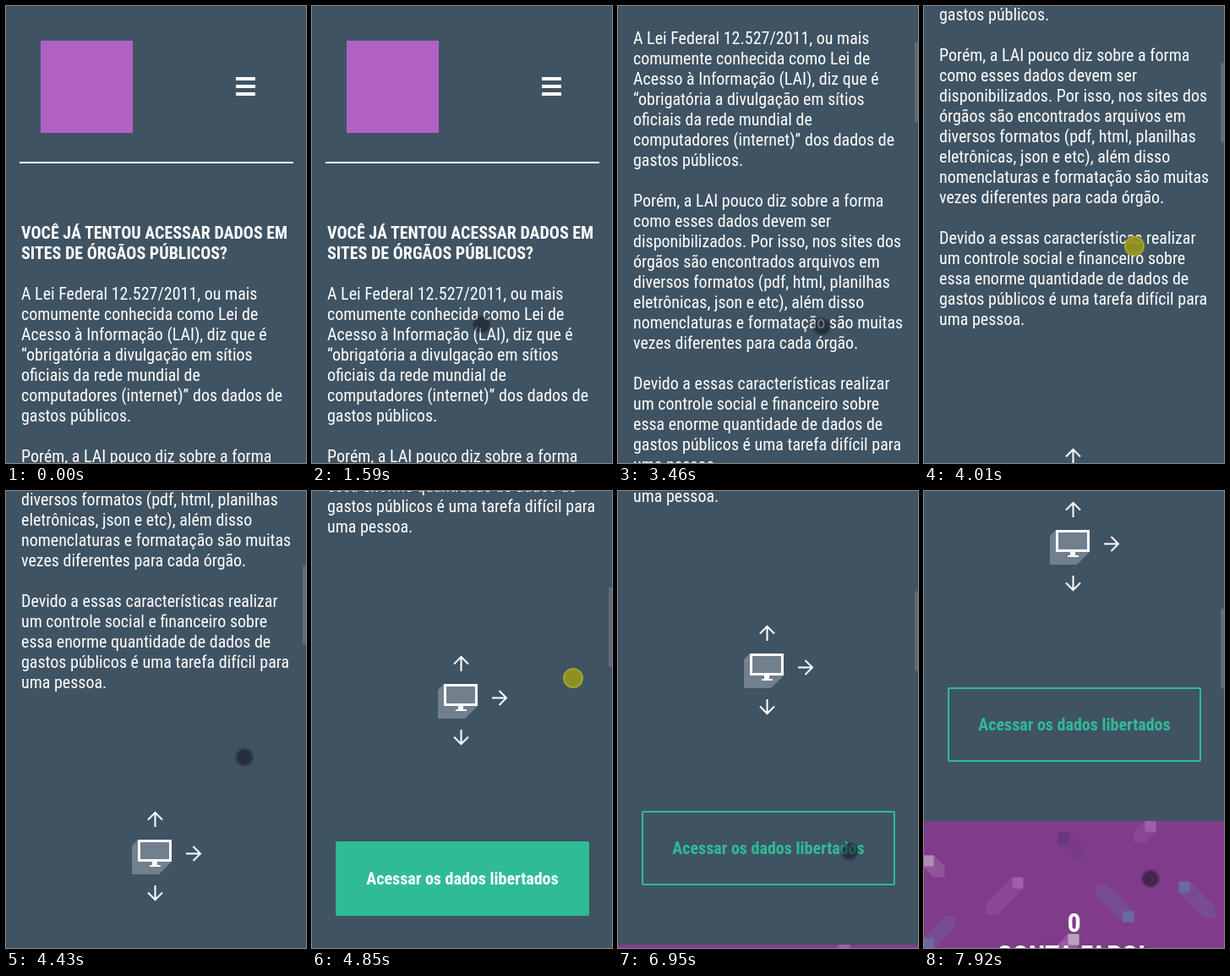
Recreate the animation shown at these times as an HTML page. Size 355 by 540 pixels, loop 8000 ms.

```html
<!DOCTYPE html>
<html lang="pt-BR">
<head>
<meta charset="utf-8">
<title>Dados abertos</title>
<style>
@property --s { syntax: "<integer>"; inherits: true; initial-value: 0; }
html, body { margin: 0; width: 100%; height: 100%; overflow: hidden; background: #3f5363; }
#stage {
  --green: #2fbb96;
  position: relative; width: 355px; height: 540px; overflow: hidden;
  background: #3f5363; color: #fff;
  font: 400 20px/24px "Roboto Condensed", Roboto, sans-serif;
  font-stretch: 75%;
  animation: scroll 8s linear infinite;
}
#stage.wide { font-size: 18px; letter-spacing: -.1px; }
#stage * { position: absolute; box-sizing: border-box; }
#stage b, #stage svg * { position: static; }
#page { left: 0; top: 0; width: 355px; height: 2000px; transform: translateY(calc(var(--s) * -1px)); }
#mark { left: 41px; top: 41px; width: 109px; height: 109px; background: #b062c4; }
#menu { left: 272px; top: 84px; width: 23px; height: 22px;
  background: linear-gradient(#fff 4px, #0000 4px 9px, #fff 9px 13px, #0000 13px 18px, #fff 18px); }
#rule { left: 16px; top: 184px; width: 324px; height: 2px; background: #fff; }
#text { left: 18px; top: 256px; white-space: pre; width: max-content; }
#icon { left: 140px; top: 990px; }
#button {
  left: 28px; top: 1216px; width: 300px; height: 88px; border: 2px solid var(--green); border-radius: 2px;
  font-weight: 700; text-align: center; line-height: 84px;
  animation: button 8s step-end infinite;
}
#tap { left: 28px; top: 1216px; width: 300px; height: 88px; background: rgba(51,181,229,.4); opacity: 0;
  animation: tap 8s linear infinite; }
#count { left: 0; top: 1374px; width: 355px; height: 626px; background: #803c8a; overflow: hidden; }
#count p { left: 0; top: 101px; width: 355px; margin: 0; text-align: center; font-weight: 700; font-size: 32px; line-height: 38.4px; }
.wide #count p { font-size: 29px; }
#bar { left: 351px; top: 0; width: 4px; height: 95px; border-radius: 2px; background: rgba(132,132,140,.5);
  transform: translateY(calc(var(--s) * .141px)); animation: bar 8s linear infinite; }
#touch { left: -12px; top: -12px; width: 24px; height: 24px; animation: move 8s linear infinite; }
#touch i { inset: 0; border-radius: 50%; }
#up { background: radial-gradient(circle, rgba(18,20,32,.55) 8.5px, rgba(18,20,32,.18) 9.8px 11px, #0000 12px); animation: press 8s step-end infinite reverse; }
#touch #up { animation: lift 8s step-end infinite; }
#down { background: rgba(148,147,30,.93); border: 2px solid #a5a52c; animation: press 8s step-end infinite; }

@keyframes scroll {
  0%, 22.625% { --s: 0; }
  28.1% { --s: 120; }
  30%, 35.375% { --s: 133; }
  38.5% { --s: 285; }
  42%, 45% { --s: 302; }
  50.125% { --s: 474; }
  53.125% { --s: 578; }
  55.5%, 56.875% { --s: 620; }
  60.625% { --s: 802; }
  63.25%, 74.4% { --s: 797; }
  82% { --s: 835; }
  86.875%, 88.625% { --s: 838; }
  93.125% { --s: 900; animation-timing-function: ease-out; }
  99%, 100% { --s: 984; }
}
@keyframes move {
  0%, 4.12% { transform: translate(323px, 496px); opacity: 0; }
  4.125% { transform: translate(323px, 496px); opacity: 1; animation-timing-function: ease-out; }
  9.25%, 11.625% { transform: translate(284px, 380px); }
  13.25%, 15.75% { transform: translate(283px, 377px); }
  18.25% { transform: translate(230px, 172px); }
  20.75%, 22.625% { transform: translate(185px, 484px); }
  28.1% { transform: translate(195px, 364px); }
  34.5%, 35.375% { transform: translate(201px, 385px); }
  38.5% { transform: translate(230px, 233px); }
  43.25% { transform: translate(241px, 378px); }
  45% { transform: translate(245px, 456px); }
  50.125% { transform: translate(249px, 284px); }
  53.125% { transform: translate(255px, 180px); }
  56.875% { transform: translate(300px, 403px); }
  60.625% { transform: translate(309px, 221px); }
  63.25% { transform: translate(309px, 226px); }
  66.875% { transform: translate(285px, 497px); }
  70%, 74.4% { transform: translate(278px, 466px); }
  82% { transform: translate(276px, 428px); }
  86.875% { transform: translate(274px, 425px); }
  88.625% { transform: translate(272px, 520px); }
  93.125%, 100% { transform: translate(268px, 458px); opacity: 1; }
}
@keyframes press {
  0%, 28.1%, 38.5%, 53.125%, 63.25%, 73.2%, 86.875%, 93.125%, 100% { opacity: 0; }
  22.625%, 34.5%, 45%, 56.875%, 72.5%, 74.4%, 88.625% { opacity: 1; }
}
@keyframes lift {
  0%, 28.1%, 38.5%, 53.125%, 63.25%, 73.2%, 86.875%, 93.125%, 100% { opacity: 1; }
  22.625%, 34.5%, 45%, 56.875%, 72.5%, 74.4%, 88.625% { opacity: 0; }
}
@keyframes bar {
  0%, 22.8% { opacity: 0; }
  23%, 31% { opacity: 1; }
  34%, 35.5% { opacity: 0; }
  36%, 66% { opacity: 1; }
  70%, 74.6% { opacity: 0; }
  75%, 100% { opacity: 1; }
}
@keyframes button {
  0% { background: var(--green); color: #fff; }
  72.5%, 100% { background: transparent; color: var(--green); }
}
@keyframes tap {
  0%, 72.49% { opacity: 0; }
  72.5%, 74.2% { opacity: 1; }
  76%, 100% { opacity: 0; }
}
</style>
</head>
<body>
<div id="stage">
  <div id="page">
    <div id="mark"></div>
    <div id="menu"></div>
    <div id="rule"></div>
    <div id="text"><b>VOCÊ JÁ TENTOU ACESSAR DADOS EM
SITES DE ÓRGÃOS PÚBLICOS?</b>

A Lei Federal 12.527/2011, ou mais
comumente conhecida como Lei de
Acesso à Informação (LAI), diz que é
“obrigatória a divulgação em sítios
oficiais da rede mundial de
computadores (internet)” dos dados de
gastos públicos.

Porém, a LAI pouco diz sobre a forma
como esses dados devem ser
disponibilizados. Por isso, nos sites dos
órgãos são encontrados arquivos em
diversos formatos (pdf, html, planilhas
eletrônicas, json e etc), além disso
nomenclaturas e formatação são muitas
vezes diferentes para cada órgão.

Devido a essas características realizar
um controle social e financeiro sobre
essa enorme quantidade de dados de
gastos públicos é uma tarefa difícil para
uma pessoa.</div>
    <svg id="icon" width="100" height="120" fill="none" stroke="#fff" stroke-width="2">
      <path d="M9 47l7-7h40v26l-15 15H9z" fill="#71808c" stroke="none"/>
      <path d="M17.5 41.5h37v23h-37z" stroke-width="3"/>
      <path d="M33 66h6v4h4v2H30v-2h3z" fill="#fff" stroke="none"/>
      <path id="arrow" d="M36.5 25V8M28 16.5L36.5 8l8.500 8.500"/>
      <path d="M36.500 94v17M28 102.500l8.500 8.500 8.500-8.500"/>
      <path d="M73 56.500h17M81.500 48l8.500 8.500-8.500 8.500"/>
    </svg>
    <div id="button">Acessar os dados libertados</div>
    <div id="tap"></div>
    <div id="count">
      <svg id="bits" width="355" height="626"></svg>
      <p>0<br>CONTA FAROL</p>
    </div>
  </div>
  <div id="bar"></div>
  <div id="touch"><i id="up"></i><i id="down"></i></div>
</div>
<script>
const stage = document.getElementById('stage');
// Smaller type when no condensed face is available
if (document.getElementById('text').offsetWidth > 340) stage.classList.add('wide');

// Centre, tail direction, tail length, colour
const bits = [
  [308, 78, 1, 1, 30, '#6a6b9c'],
  [242, 113, -1, -1, 32, '#6a6b9c'],
  [111, 73, -1, 1, 31, '#a05fa8'],
  [268, 6, -1, 1, 13, '#a05fa8'],
  [5, 47, 1, 1, 13, '#b08cb4'],
  [165, 20, 1, 1, 19, '#66387a'],
  [177, 140, -1, 1, 24, '#bd9fc2'],
  [5, 145, 1, -1, 26, '#6a6b9c']
];
document.getElementById('bits').innerHTML = bits.map(([x, y, sx, sy, n, c]) =>
  `<g transform="translate(${x} ${y}) scale(${sx} ${sy})" fill="${c}">
    <path d="M-6.5-6.5h13l${n} ${n}v13h-13l${-n} ${-n}z" opacity=".32"/>
    <path d="M-6.5-6.5h13v13h-13z"/></g>`).join('');
</script>
</body>
</html>
```
